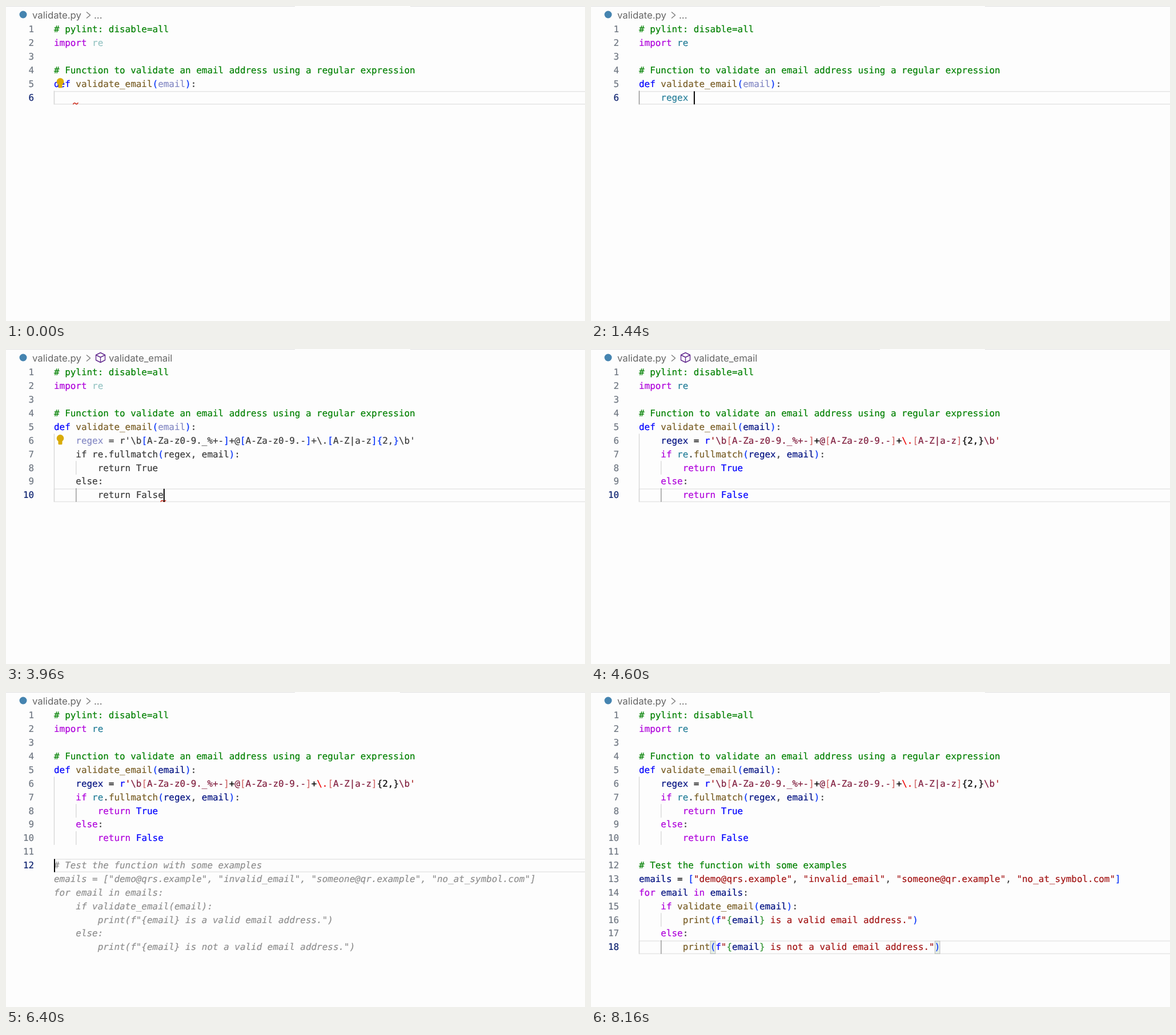
These frames come from a looping animation (1014 by 552 pixels, 8200 ms). An HTML page:

```html
<!DOCTYPE html>
<html lang="en">
<head>
<meta charset="utf-8">
<title>validate.py</title>
<style>
html, body { margin: 0; width: 100%; height: 100%; overflow: hidden; background: #fdfdfd; }
svg { display: block; width: 100%; height: 100%; }
text {
  font: 15.93px "DejaVu Sans Mono", monospace; white-space: pre; color: #3b3b3b;
  text-rendering: geometricPrecision;
}
text, tspan { fill: currentColor; stroke: currentColor; stroke-width: .2px; }
.ui { font: 16.8px Inter, sans-serif; color: #666; stroke: none; }
.num { text-anchor: end; color: #6e7681; }
.on { color: #0b216f; }
.c { color: #008000; }  .k { color: #af00db; }  .b { color: #0000ff; }
.f { color: #795e26; }  .v { color: #001080; }  .m { color: #267f99; }
.s { color: #a31515; }  .p { color: #0431fa; }  .q { color: #319331; }
.r { color: #811f3f; }  .o { color: #d16969; }  .e { color: #ee0000; }
.x { color: #000; }     .d { color: #3b3b3b; }
.V { color: #8489c4; }  .M { color: #97c5c4; }
.g { color: #8e8e8e; font-style: italic; }
.hit { color: #0066bf; font-weight: bold; }
</style>
</head>
<body>
<svg id="stage" viewBox="0 0 1014 552" xmlns="http://www.w3.org/2000/svg"></svg>
<script>
const LOOP = 8200, LEFT = 84, CHAR = 9.59, ROW = 23.88;
const stage = document.getElementById('stage');

// Tokens are split by ¦ and start with their colour class.
const CODE = String.raw`c# pylint: disable=all
kimport ¦mre

c# Function to validate an email address using a regular expression
bdef ¦fvalidate_email¦p(¦vemail¦p)¦d:
d    ¦vregex¦x = ¦br¦s'¦r\b¦o[¦rA-Za-z0-9._%+-¦o]¦x+¦r@¦o[¦rA-Za-z0-9.-¦o]¦x+¦e\.¦o[¦rA-Z|a-z¦o]¦x{2,}¦r\b¦s'
d    ¦kif ¦mre¦d.¦ffullmatch¦p(¦vregex¦d, ¦vemail¦p)¦d:
d        ¦kreturn ¦bTrue
d    ¦kelse¦d:
d        ¦kreturn ¦bFalse

c# Test the function with some examples
vemails¦x = ¦p[¦s"demo@qrs.example"¦d, ¦s"invalid_email"¦d, ¦s"someone@qr.example"¦d, ¦s"no_at_symbol.com"¦p]
kfor ¦vemail ¦kin ¦vemails¦d:
d    ¦kif ¦fvalidate_email¦p(¦vemail¦p)¦d:
d        ¦fprint¦p(¦bf¦s"¦q{¦vemail¦q}¦s is a valid email address."¦p)
d    ¦kelse¦d:
d        ¦fprint¦p(¦bf¦s"¦q{¦vemail¦q}¦s is not a valid email address."¦p)`.split('\n');

const TYPED = [[320, 'r'], [440, 're'], [560, 'reg'], [800, 'rege'], [1080, 'regex'],
  [1280, 'regex '], [1480, 'regex ='], [1760, 'regex = ']];
const GHOST_1 = 2640, ACCEPT_1 = 3880, COLOUR_1 = 4040, CHECKED = 4400;
const ENTER_1 = 4640, ENTER_2 = 5160, DEDENT = 5320;
const GHOST_2 = 6200, ACCEPT_2 = 7520, COLOUR_2 = 7720;
const EDITS = [-600, ...TYPED.map(e => e[0]), ACCEPT_1, ENTER_1, ENTER_2, DEDENT, ACCEPT_2];
const WORDS = ['raise', 'range', 're', 'repr', 'return', 'reversed', 'round', 'ReferenceError',
  'ResourceWarning', 'RuntimeError', 'RuntimeWarning', 'RecursionError'];

const mid = n => 41 + (n - 1) * ROW;
const colX = c => LEFT + c * CHAR;
const span = (cls, s) => `<tspan class="${cls}">${s}</tspan>`;
const text = (x, y, s, cls = '') => `<text x="${x}" y="${y}" class="${cls}" xml:space="preserve">${s}</text>`;
const rect = (x, y, w, h, attr) => `<rect x="${x}" y="${y}" width="${w}" height="${h}" ${attr}/>`;
const path = (d, colour, w = 1.5) => `<path d="${d}" fill="none" stroke="${colour}" stroke-width="${w}" stroke-linejoin="round"/>`;
const raw = n => CODE[n - 1].split('¦').map(s => s.slice(1)).join('');
const coloured = s => s.split('¦').map(p => span(p[0], p.slice(1))).join('');
const plain = s => s.replace(/[()[\]{}]/g, b => span('p', b));
const line = (n, s) => text(LEFT, mid(n) + 5.4, s);

const cube = (x, y, colour) => path(`M${x} ${y - 8.5}l8 4v9l-8 4-8-4v-9zm-8 4l8 4 8-4m-8 4v9`, colour, 1.4);
const classIcon = (x, y, colour) =>
  path(`M${x - 8.5} ${y - 3}l5-5 4 4-5 5zM${x - .5} ${y - 4}h6M${x - 2} ${y - 4}v8h5` +
    `M${x + 5} ${y - 3.5}l2.5-2.5 2 2-2.5 2.5zM${x + 3} ${y + 5}l2.5-2.5 2.5 2.5-2.5 2.5z`, colour, 1.5);
const bulb = n => {
  const y = mid(n) - 4;
  return `<g fill="#d9ab08"><circle cx="95" cy="${y}" r="6.3"/>` +
    rect(91.5, y + 3, 7, 8, 'rx="1.5"') + '</g>';
};
const squiggle = (n, c) => {
  const x = colX(c) - 5;
  return path(`M${x} ${mid(n) + 12}q2.2-4 4.5-1.5t4.5-1.5`, '#d03020', 1.6);
};
const guide = (c, from, to, active) => rect(colX(c) - .2, mid(from) - 11.9, 1.3,
  (to - from + 1) * ROW, `fill="${active ? '#8f8f8f' : '#d6d6d6'}"`);

function mark(label, query) {
  let i = 0;
  return [...label].map(ch =>
    ch.toLowerCase() === query[i] ? (i++, span('hit', ch)) : ch).join('');
}

function popup(x, words, query) {
  const top = 174, h = words.length * 24 + 4;
  let out = rect(x + .5, top + .5, 572, h - 1,
    'rx="3" fill="#f8f8f8" stroke="#c8c8c8" style="filter:drop-shadow(0 1px 3px #0002)"');
  out += rect(x + 1, top + 1, 571, 24, 'fill="#e6e6e6"');
  words.forEach((w, i) => {
    const y = top + 12 + i * 24.2, upper = w[0] < 'a';
    const icon = upper ? classIcon : cube;
    out += icon(x + 14, y, i ? (upper ? '#d67e00' : '#652d90') : '#222');
    out += text(x + 30, y + 5.4, mark(w, query), i ? 'd' : 'x');
  });
  return out;
}

function suggestions(t) {
  if (t < 360 || t >= 1080) return '';
  if (t < 440) return popup(133, WORDS, 'r');
  if (t < 560) return popup(133, WORDS, 're');
  if (t < 800) return popup(152, ['ResourceWarning', 'RuntimeWarning'], 'reg');
  return popup(152, ['ResourceWarning'], 'reeg');
}

function header(unused, inside) {
  const end = unused ? 708 : 690;
  return rect(0, 0, 506, 1.2, 'fill="#e3e3e3"') + rect(end, 0, 1014 - end, 1.2, 'fill="#e3e3e3"') +
    '<circle cx="30" cy="15" r="6.5" fill="#4584b0"/>' +
    text(46, 22, 'validate.py', 'ui') + path('M141 10.5l6.5 5.5-6.5 5.5', '#777', 1.3) +
    (inside ? cube(165.5, 15, '#652d90') + text(180, 22, 'validate_email', 'ui') : text(154, 22, '...', 'ui'));
}

function scene(t) {
  const typed = TYPED.filter(e => e[0] <= t).map(e => e[1]).pop() || '';
  const unused = t < 320 || (t >= 1480 && t < CHECKED);
  const checked = t >= CHECKED;
  let cur = 6, col = 4 + typed.length;
  if (t >= ACCEPT_1) [cur, col] = [10, 20];
  if (t >= ENTER_1) [cur, col] = [11, 4];
  if (t >= ENTER_2) [cur, col] = [12, t < DEDENT ? 4 : 0];
  if (t >= ACCEPT_2) [cur, col] = [18, raw(18).length];

  let out = header(unused, t >= 1480 && t < DEDENT);
  out += rect(LEFT + .5, mid(cur) - 10.6, 940, 22.2, 'fill="none" stroke="#e7e7e7" stroke-width="1.6"');

  // Indent guides
  if (cur === 6) out += guide(0, 6, 6, typed);
  else {
    out += guide(0, 6, 10) + guide(4, 8, 8) + guide(4, 10, 10, cur === 10);
    if (cur === 18) out += guide(0, 15, 18) + guide(4, 16, 16) + guide(4, 18, 18, true);
  }

  for (let n = 1; n <= cur; n++) out += text(49.2, mid(n) + 5.4, n, n === cur ? 'num on' : 'num');

  // Code above the edit
  for (let n = 1; n <= 5; n++) {
    let s = CODE[n - 1];
    if (n === 2 && unused) s = s.replace('mre', 'Mre');
    if (n === 5 && !checked) s = s.replace('vemail', 'Vemail');
    out += line(n, coloured(s));
  }

  // Function body
  if (t < ACCEPT_1) {
    const name = span(t < 1480 ? 'm' : 'V', typed.slice(0, 5));
    const ghost = t >= GHOST_1;
    out += line(6, '    ' + name + span('x', typed.slice(5)) + (ghost ? span('g', raw(6).slice(12)) : ''));
    if (ghost) for (let n = 7; n <= 10; n++) out += line(n, span('g', raw(n)));
  } else for (let n = 6; n <= 10; n++) {
    let s = t >= COLOUR_1 ? coloured(CODE[n - 1]) : plain(raw(n));
    if (n === 6 && t < COLOUR_1) s = '    ' + span('V', 'regex') + plain(raw(6).slice(9));
    out += line(n, s);
  }

  // Examples
  if (t >= COLOUR_2) {
    for (const c of [13, col - 1])
      out += rect(colX(c) + .5, mid(18) - 10.4, 8.6, 22, 'fill="#e5efe5" stroke="#b9b9b9"');
  }
  if (t >= GHOST_2) for (let n = 12; n <= 18; n++) {
    out += line(n, t < ACCEPT_2 ? span('g', raw(n)) : t < COLOUR_2 ? plain(raw(n)) : coloured(CODE[n - 1]));
  }

  if (t < 320) out += bulb(5);
  if (t >= 2800 && t < CHECKED) out += bulb(6);
  if (t < 320 || (t >= 2100 && t < CHECKED)) out += squiggle(cur, col);

  const last = EDITS.filter(e => e <= t).pop();
  if (Math.floor((t - last) / 500) % 2 === 0) out += rect(colX(col), mid(cur) - 11, 2, 23, 'fill="#000"');
  return out + suggestions(t);
}

let shown = '';
function draw(now) {
  const next = scene(now % LOOP);
  if (next !== shown) stage.innerHTML = shown = next;
}
const start = performance.now();
function tick() {
  draw(performance.now() - start);
  requestAnimationFrame(tick);
}
tick();
</script>
</body>
</html>
```
